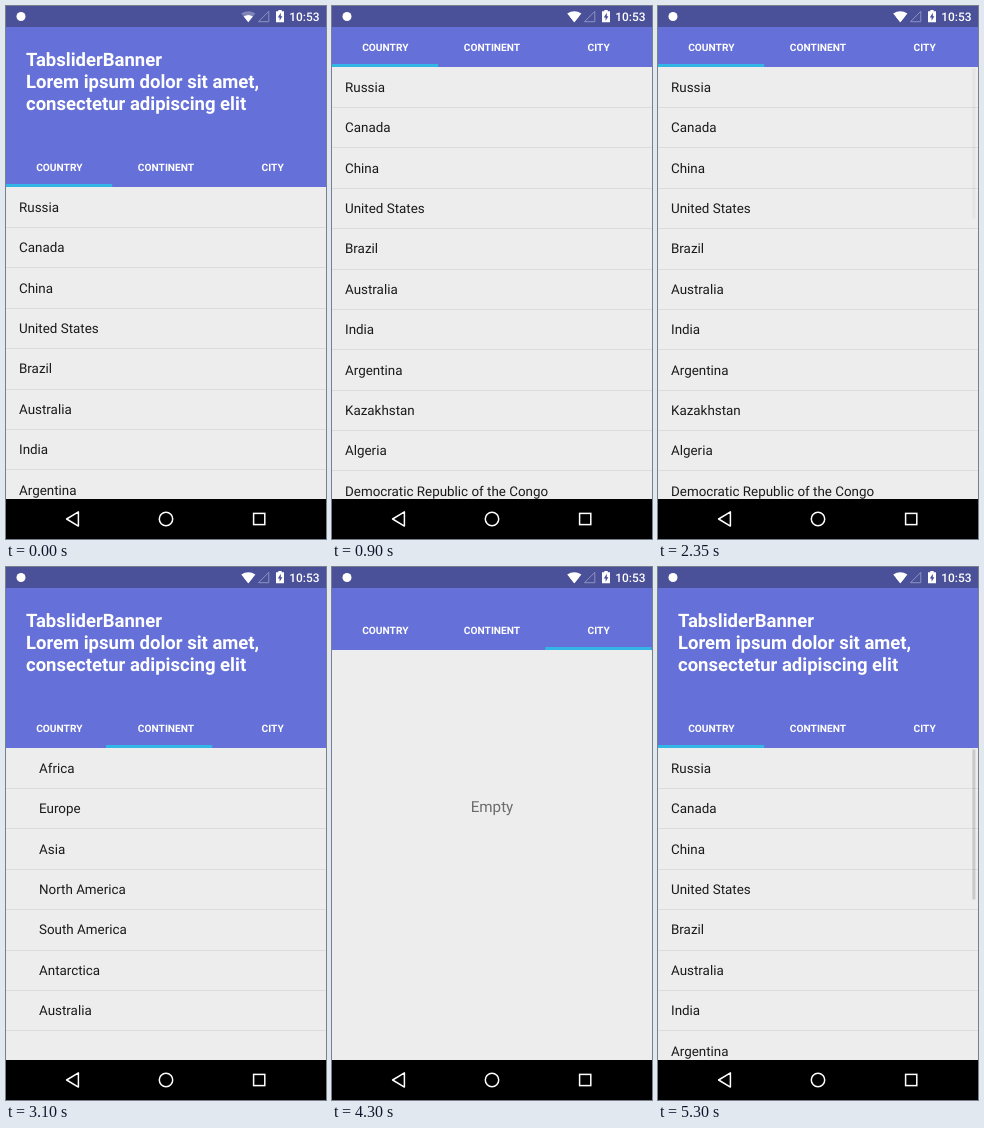
An HTML page that plays this animation: 320x533 px, repeating every 5350 ms.

```html
<!DOCTYPE html>
<html lang="en">
<head>
<meta charset="utf-8">
<title>Collapsing header</title>
<style>
  html, body { margin: 0; width: 100%; height: 100%; overflow: hidden; background: #ededed; }
  svg { display: block; width: 100vw; height: 100vh; }
  text { font-family: Roboto, sans-serif; text-rendering: geometricPrecision; white-space: pre; }
  .row { font-size: 13.4px; fill: #1a1a1a; }
  .line { fill: #dcdcdc; shape-rendering: crispEdges; }
  .title { font-size: 18.5px; font-weight: 700; fill: #fff; }
  .tab { font-size: 10.2px; font-weight: 700; fill: #fff; text-anchor: middle; }
  .empty { font-size: 15.2px; fill: #6c6c6c; text-anchor: middle; }
  .clock { font-size: 11.9px; font-weight: 500; fill: #fff; text-anchor: end; }
</style>
</head>
<body>
<svg viewBox="0 0 320 533" preserveAspectRatio="none">
  <rect width="320" height="533" fill="#ededed"/>
  <g id="pages">
    <g id="country">
      <g id="countryRows"></g>
      <rect id="thumb" x="314.4" width="3" height="150" fill="#000"/>
    </g>
    <g id="continent" transform="translate(320 0)"></g>
    <g transform="translate(640 0)">
      <text class="empty" x="160" y="343">Empty</text>
    </g>
  </g>
  <path id="glow" d="M0 478Q160 450 320 478V493H0Z" fill="#6570d8"/>

  <g id="header">
    <rect y="21" width="320" height="160" fill="#6570d8"/>
    <text class="title" x="20" y="60.2">TabsliderBanner</text>
    <text class="title" x="20" y="82">Lorem ipsum dolor sit amet,</text>
    <text class="title" x="20" y="103.7">consectetur adipiscing elit</text>
    <text class="tab" x="53.3" y="165">COUNTRY</text>
    <text class="tab" x="160" y="165">CONTINENT</text>
    <text class="tab" x="266.7" y="165">CITY</text>
    <rect id="marker" y="178" width="106.2" height="3" fill="#33b5e5"/>
  </g>

  <rect width="320" height="21" fill="#4a5198"/>
  <circle cx="15" cy="10.5" r="4.5" fill="#fff"/>
  <path id="wifi" d="M235.2 7.6Q242.3 2.8 249.4 7.6L242.3 16.2Z" fill="#fff"/>
  <path d="M237.7 10.6Q242.3 7.4 246.9 10.6L242.3 16.2Z" fill="#fff"/>
  <path d="M252.5 15.7L262.8 5.3V15.7Z" fill="none" stroke="#8d92c4"/>
  <path d="M270 5.3H272.3V4H275.7V5.3H278V16.3H270Z" fill="#fff"/>
  <path d="M274.8 6.8L271.8 11.4H273.6V14.8L276.4 10.2H274.8Z" fill="#4a5198"/>
  <text class="clock" x="313.5" y="15">10:53</text>

  <rect y="493" width="320" height="40" fill="#000"/>
  <g fill="none" stroke="#fff" stroke-width="1.5">
    <path d="M60.6 513L72.4 505.9V520.1Z" stroke-linejoin="round"/>
    <circle cx="160" cy="513" r="6.7"/>
    <rect x="247.6" y="507.4" width="11.2" height="11.2"/>
  </g>
</svg>
<script>
const LOOP = 5350, STEP = 50, TOP = 181, ROW = 40.4, BOTTOM = 739;
const $ = id => document.getElementById(id);
const NS = 'http://www.w3.org/2000/svg';

const countries = ['Russia', 'Canada', 'China', 'United States', 'Brazil', 'Australia', 'India',
  'Argentina', 'Kazakhstan', 'Algeria', 'Democratic Republic of the Congo', 'Saudi Arabia',
  'Mexico', 'Indonesia', 'Sudan', 'Libya', 'Iran', 'Mongolia', 'Peru', 'Chad', 'Niger', 'Angola',
  'Mali', 'South Africa', 'Colombia', 'Ethiopia', 'Bolivia', 'Mauritania', 'Egypt'];
const continents = ['Africa', 'Europe', 'Asia', 'North America', 'South America', 'Antarctica', 'Australia'];

function add(parent, tag, attrs) {
  const el = document.createElementNS(NS, tag);
  for (const key in attrs) el.setAttribute(key, attrs[key]);
  return parent.appendChild(el);
}

function fillList(parent, names) {
  names.forEach((name, i) => {
    const y = TOP + i * ROW;
    add(parent, 'text', { class: 'row', x: 13, y: y + 24.7 }).textContent = name;
    add(parent, 'rect', { class: 'line', y: Math.floor(y + ROW), width: 320, height: 1 });
  });
}

// Tracks are [time, value] pairs
const collapse = [[300, 0], [900, 120], [2350, 120], [2650, 0], [3800, 0], [4000, 120],
  [4250, 120], [4300, 98], [4500, 0]];
const scroll = [[1050, 0], [1550, BOTTOM], [1700, BOTTOM], [2150, 0]];
const page = [[2800, 0], [3100, 0.9375], [3200, 1], [3500, 2], [4600, 2], [4950, 1], [5300, 0]];
const glow = [[1550, 0], [1600, 0.17], [1800, 0]];
const thumb = [[1050, 0], [1100, 0.15], [2200, 0.15], [2350, 0.04], [2400, 0], [4850, 0], [4900, 0.15]];
const wifi = [[300, 0.3], [350, 1]];

const ease = u => (u + u * u * (3 - 2 * u)) / 2;

function at(track, t) {
  const i = track.findIndex(([time]) => time > t);
  if (i === 0) return track[0][1];
  if (i < 0) return track[track.length - 1][1];
  const [t0, a] = track[i - 1], [t1, b] = track[i];
  return a + (b - a) * ease((t - t0) / (t1 - t0));
}

const move = (id, x, y) => $(id).setAttribute('transform', `translate(${x} ${y})`);
const fade = (id, alpha) => $(id).setAttribute('opacity', alpha);

function draw(t) {
  const up = at(collapse, t), down = at(scroll, t), p = at(page, t);
  move('header', 0, -up);
  move('pages', -320 * p, -up);
  move('countryRows', 0, -down);
  $('marker').setAttribute('x', 106.67 * p);
  $('thumb').setAttribute('y', TOP + 1.5 + down / BOTTOM * 278.5);
  fade('thumb', at(thumb, t));
  fade('glow', at(glow, t));
  fade('wifi', at(wifi, t));
}

fillList($('countryRows'), countries);
fillList($('continent'), continents);

const start = performance.now();
function tick() {
  const t = (performance.now() - start) % LOOP;
  draw(Math.floor(t / STEP) * STEP);
  requestAnimationFrame(tick);
}
draw(0);
tick();
</script>
</body>
</html>
```
